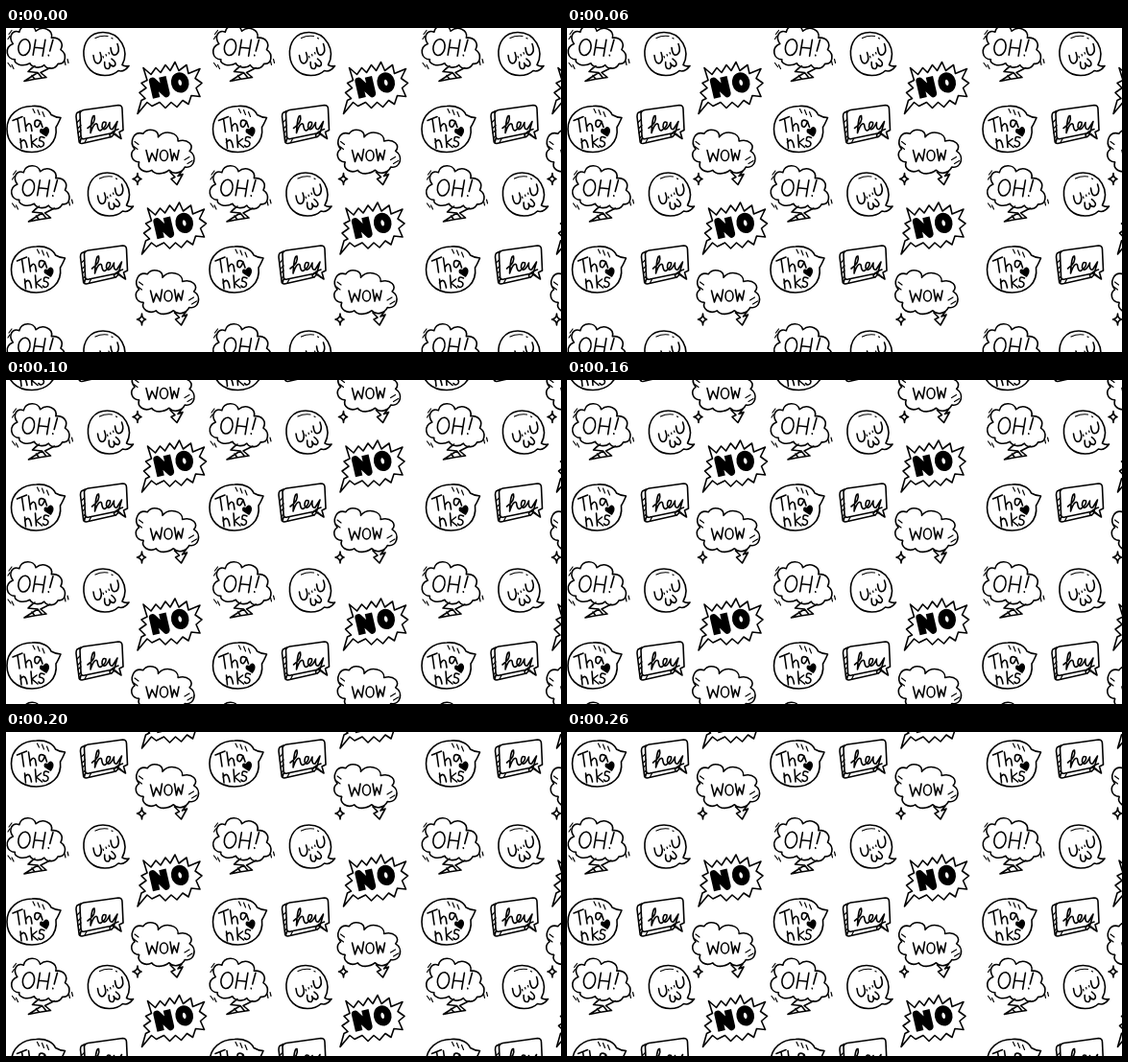
Recreate the animation shown at these times as an HTML page. Size 578 by 338 pixels, loop 300 ms.

```html
<!DOCTYPE html>
<html lang="en">
<head>
<meta charset="utf-8">
<title>Speech bubble pattern</title>
<style>
html, body { margin: 0; width: 100%; height: 100%; overflow: hidden; background: #fff; }
svg { display: block; width: 578px; height: 338px; }
.ink { fill: none; stroke: #000; stroke-width: 1.6; stroke-linecap: round; stroke-linejoin: round; }
.thin { stroke-width: 1.2; }
.bold { stroke-width: 7.5; stroke-linecap: butt; }
.solid { fill: #000; }
#sheet { animation: climb 300ms step-end infinite; }
@keyframes climb {
  0% { transform: translateY(332px); }
  33.333% { transform: translateY(213px); }
  66.667% { transform: translateY(113px); }
}
</style>
</head>
<body>
<svg viewBox="0 0 578 338" role="img" aria-label="Pattern of doodled speech bubbles">
  <defs>
    <g id="bubbles" class="ink">
      <g aria-label="OH!">
        <path transform="rotate(7 32 0)" d="M7-1C1-7 4-16 12-14C13-23 26-25 29-17C35-24 47-21 46-12C54-14 60-8 57-1C65 3 64 14 56 14C54 20 46 22 42 17C38 22 29 21 27 17C20 22 10 20 11 15C2 16-2 4 7-1Z"/>
        <path d="M30 19L23 25L33 26L19 35L29 33L42 31L36 26L46 21M33 26L37 31M27 29L30 33M23 25L27 21"/>
        <path class="thin" d="M2 16L5 20M6 18L8 22M61 14L62 18M64 12L65 16M3-14L6-18M2-9L4-12"/>
        <g transform="rotate(6 32 0)">
          <ellipse cx="19" cy="1" rx="6" ry="8.5" transform="rotate(6 19 1)"/>
          <path d="M30-8L29 8M40-9L39 8M30 0L39 0M48-10L46 2M45 6.500L45.200 7"/>
        </g>
      </g>
      <g aria-label="U ω U">
        <path d="M121 18C129 3 119-16 101-16C87-16 80-5 81 8C82 21 91 29 103 29C110 29 114 27 117 24Q123 26 128 19Q124 20 121 18"/>
        <path class="thin" d="M93-10Q99-13 106-12M110-10L111-9.500M101 9L101.500 10.500M104 7L104.500 8.500M107 5L107.500 6.500"/>
        <path d="M91 8Q92 18 97 16Q101 13 98 5M109 0Q110 10 115 7Q119 4 116-4"/>
        <path transform="rotate(-25 108 17)" d="M104 13Q100 20 105 21Q108 20 108 16Q108 20 111 21Q116 20 112 13"/>
      </g>
      <g aria-label="NO">
        <path d="M137 69L141 55L145 53L139 47L146 42L141 37L147 34L143 21L151 28L156 21L161 26L166 18L171 24L176 15L180 24L188 18L190 27L202 22L197 32L204 37L198 42L202 51L193 50L190 59L184 55L178 62L172 57L166 63L160 57L152 61L147 57Z"/>
        <g class="bold" transform="translate(170 39) rotate(-13)">
          <path d="M-16 10V-8L-5 8V-10"/>
          <ellipse cx="11.500" cy="0" rx="5.500" ry="7"/>
        </g>
      </g>
      <g aria-label="Thanks">
        <path d="M27 61C38 60 45 65 47 70Q52 73 57 73Q54 80 52 83C54 99 42 109 27 109C10 109 1 98 1 85C1 70 13 61 27 61Z"/>
        <path class="thin" d="M28 64L30 68M33 65L35 70M38 67L40 72"/>
        <path d="M7 76L17 72M12 74L14 88M19 73L21 87M21 82Q24 77 26 81L27 87M36 77Q29 73 30 81Q33 86 36 77L38 83"/>
        <path d="M15 95L16 105M15 99Q20 92 22 104M26 91L27 104M32 95L27 99L33 104M40 94Q34 91 35 97Q41 98 39 102Q36 105 34 102"/>
        <path class="solid" d="M42 92L36 88Q35 84 39 86Q42 81 44 85Q45 88 42 92Z"/>
      </g>
      <g aria-label="hey">
        <path d="M81 65L117 60Q121 60 121 64L122 86L118 88L120 95L111 89L82 95Q78 96 78 92L77 69Q77 66 81 65M78 66L74 68Q73 69 73 72L76 97Q76 100 79 100L110 93M78 95L77 99"/>
        <path class="thin" d="M74 78L77 75M75 84L78 81M75 89L78 86M76 94L78 92M82 99L84 95M114 90L117 93"/>
        <path d="M85 84Q94 78 92 71Q89 70 88 89Q92 77 95 80Q96 88 99 86Q105 82 104 78Q100 76 100 83Q103 89 108 78Q107 86 111 85L116 77L112 91Q108 95 108 91Q111 87 117 85"/>
      </g>
      <g aria-label="WOW">
        <path transform="rotate(6 164 108)" d="M134 109C127 102 131 90 141 92C145 85 157 86 157 94C163 85 178 87 178 96C188 92 196 99 191 105C200 109 198 123 188 122C185 130 176 131 172 127C166 133 157 133 154 129C147 134 138 129 140 122C131 122 129 113 134 109Z"/>
        <path d="M171 130L176 135L172 137L178 143L184 132L179 134L183 129"/>
        <path class="thin" d="M134 98L138 101M133 103L137 106M189 121L194 118M186 117L191 114"/>
        <path d="M146 107L149 119L152 110L156 118L158 106M171 106L173 118L175 110L178 117L180 107"/>
        <ellipse cx="164.500" cy="112.500" rx="4" ry="5.500"/>
        <path d="M137 131Q137 136 141 137Q137 138 137 143Q137 138 132 137Q137 136 137 131Z"/>
      </g>
    </g>
    <g id="rowA">
      <use href="#bubbles"/>
      <use href="#bubbles" x="214.5"/>
      <use href="#bubbles" x="432"/>
    </g>
    <g id="rowB">
      <use href="#bubbles" x="4.5"/>
      <use href="#bubbles" x="211"/>
      <use href="#bubbles" x="436.5"/>
    </g>
  </defs>
  <g id="sheet">
    <use href="#rowA" y="-311.5"/>
    <use href="#rowB" y="-165"/>
    <use href="#rowA"/>
    <use href="#rowB" y="146.5"/>
  </g>
</svg>
</body>
</html>
```
